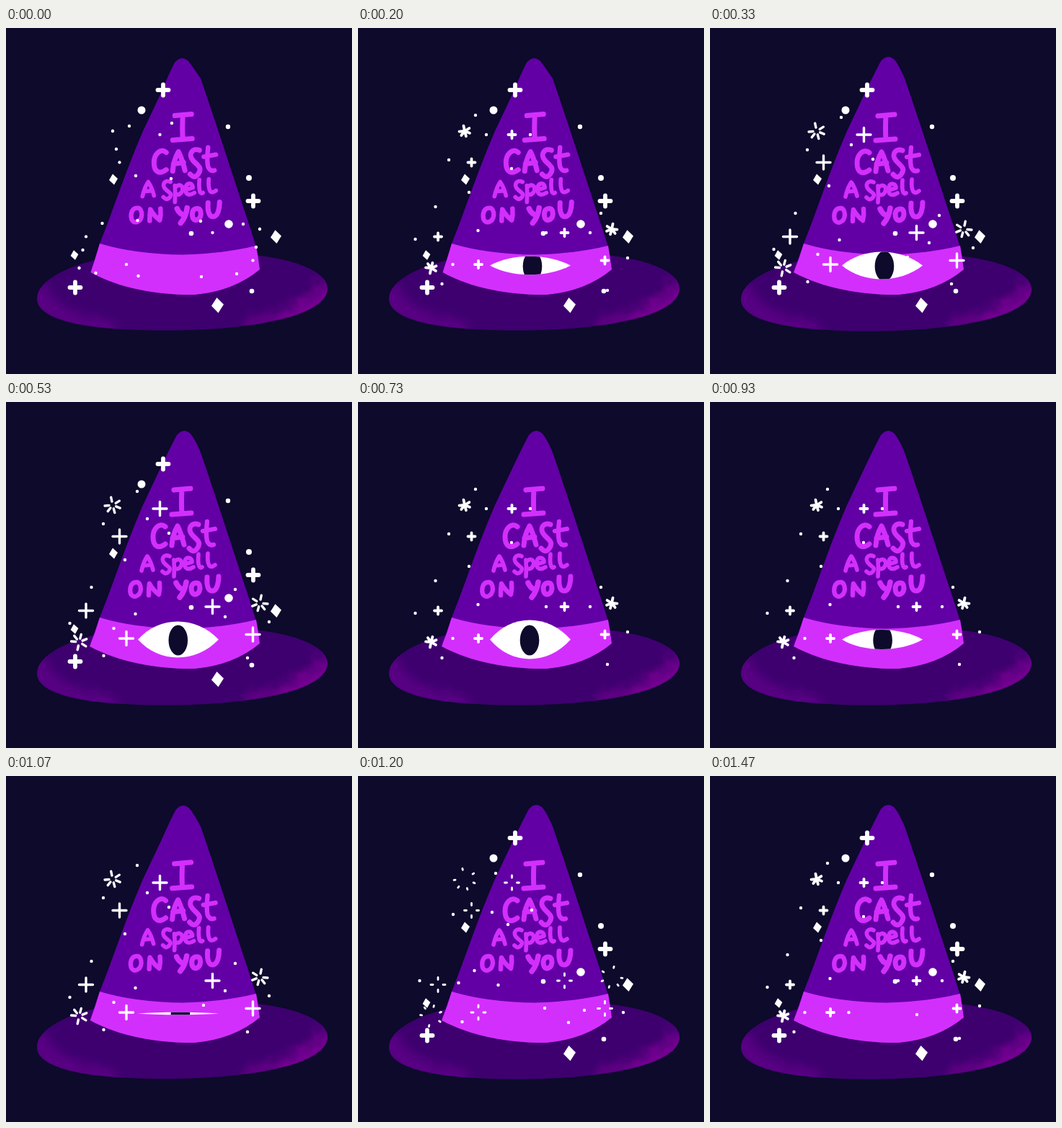
An HTML page for the animation above (1.54 s loop, 480x480 px).

```html
<!DOCTYPE html>
<html lang="en">
<head>
<meta charset="utf-8">
<title>Witch hat</title>
<style>
  html, body { margin: 0; width: 100%; height: 100%; overflow: hidden; background: #0d0a2c; }
  svg { display: block; width: 100%; height: 100%; }
  .line { fill: none; stroke-linecap: round; stroke-linejoin: round; }
</style>
</head>
<body>
<svg viewBox="0 0 480 480" role="img" aria-label="I cast a spell on you">
  <defs>
    <clipPath id="brimClip"><use href="#brim"/></clipPath>
    <clipPath id="eyeClip"><path id="lid"/></clipPath>
    <filter id="soft" x="-40%" y="-60%" width="180%" height="220%">
      <feGaussianBlur stdDeviation="7" result="blur"/>
      <feTurbulence type="fractalNoise" baseFrequency=".06" numOctaves="2" seed="4"/>
      <feDisplacementMap in="blur" scale="14"/>
    </filter>
  </defs>
  <rect width="480" height="480" fill="#0d0a2c"/>

  <g id="brimGroup">
    <path id="brim" fill="#3e006f" d="M122 323C88 331 43 350 43 376C43 400 88 420 220 420C350 420 446 398 446 362C446 338 400 322 349 316Z"/>
    <g clip-path="url(#brimClip)" class="line">
      <g filter="url(#soft)">
        <path d="M345 417Q430 399 449 358" stroke="#74008f" stroke-width="34" opacity=".6"/>
        <path d="M385 404Q425 392 445 370" stroke="#8b00a0" stroke-width="18" opacity=".6"/>
        <path d="M45 366Q54 406 140 420" stroke="#6c0092" stroke-width="30" opacity=".6"/>
      </g>
    </g>
  </g>

  <path id="cone" fill="#6200a5"/>
  <path id="band" fill="#d32ffc"/>

  <g id="words" class="line" stroke="#d32ffc" stroke-width="7">
    <path d="M233 122L256 120M244 122Q243 140 244 155M230 156L257 154"/>
    <path d="M221 173C213 166 204 176 204 187C204 201 212 204 221 197"/>
    <path d="M230 199Q231 184 238 172Q243 182 247 198M231 189L245 187"/>
    <path d="M267 170C257 166 251 176 258 184S271 194 266 202S257 206 254 203"/>
    <path d="M279 166Q277 184 279 193Q282 200 288 198M273 179L290 176" stroke-width="6.3"/>
    <g stroke-width="5.7">
      <path d="M188 234Q191 221 196 214Q201 221 204 233M191 227L202 226"/>
      <path d="M227 214C219 210 214 218 220 224S230 230 226 235S219 237 217 235"/>
      <path d="M233 219Q234 231 233 242M234 221C240 215 246 221 243 227S236 232 234 230"/>
      <path d="M248 225L258 222C258 215 250 214 248 221C246 231 252 234 260 229"/>
      <path d="M267 211Q266 223 268 228Q270 231 272 229M280 210Q279 222 282 227Q285 230 290 226"/>
    </g>
    <path d="M181 250C173 250 171 259 173 266C176 273 186 270 187 260C187 254 185 250 181 250Z" stroke-width="6.3"/>
    <path d="M198 268Q198 259 199 252Q204 261 212 267Q214 259 213 251" stroke-width="6.5"/>
    <path d="M236 251Q239 258 245 260M250 250Q248 263 241 271" stroke-width="7.5"/>
    <path d="M264 251C257 251 256 258 258 264C261 269 268 267 269 259C269 253 267 251 264 251Z"/>
    <path d="M279 243C278 256 281 263 287 262S295 250 295 242"/>
  </g>

  <g fill="#fff" stroke="#fff">
    <g id="bold"></g>
    <g id="sparks"></g>
  </g>

  <g id="eye" clip-path="url(#eyeClip)">
    <rect x="180" y="300" width="120" height="60" fill="#fff"/>
    <ellipse id="pupil" cy="330.5" rx="13.3" ry="21" fill="#0d0a2c"/>
  </g>
</svg>

<script>
const LOOP = 1540, STEPS = 23, CLOSED = 17;
const $ = id => document.getElementById(id);

// One cluster of sparkles, shown three times with mirroring: x, y, flip x, flip y
const clusters = [[148, 143, 1, 1], [101.5, 333, 1, -1], [352, 279, -1, 1]];
const rays = [22, 75, 128, 175, 258, 328];
const cross = [0, 90, 180, 270];

// Growth stages: inner and outer radius of plus and star, line width, dust around them
const stages = [
  { plus: [0, .1], star: [0, .1], width: 4.2, dust: [[23, -7], [5, 25], [82, -11], [32, 62], [81, 66]] },
  { plus: [0, 5], star: [0, 7.5], width: 3.8, dust: [[15, -22], [30, 5], [91, 5], [-22, 40], [65, 52], [6, 85]] },
  { plus: [0, 9.5], star: [5, 11], width: 3.4, dust: [[34, -19], [-13, 26], [48, 19], [17, 76], [78, 39]] },
  { plus: [7, 10], star: [13, 15], width: 2.8, dust: [[43, -8], [38, 46], [93, 43], [60, 63], [-16, 49]] }
];

const boldPluses = [[218, 86], [343, 240], [96, 360]];
const boldDots = [[188, 114, 5.5], [308, 137, 3.2], [337, 208, 4], [309, 272, 5.8], [341, 365, 3.3], [257, 285, 3.3]];
const diamonds = [[149, 210, 6], [374.5, 289.5, 7.5], [95, 315, 5.4], [293.5, 384.5, 8.5]];

const dot = ([x, y, r = 2.2]) => `<circle cx="${x}" cy="${y}" r="${r}" stroke="none"/>`;

const diamond = ([x, y, w]) => {
  const h = w * 1.25;
  return `<path stroke="none" d="M${x - 1} ${y - h}L${x + w} ${y - 1}L${x + 1} ${y + h}L${x - w} ${y + 1}Z"/>`;
};

function burst([x, y], angles, [inner, outer], width) {
  const d = angles.map(a => {
    const c = Math.cos(a * Math.PI / 180), s = Math.sin(a * Math.PI / 180);
    return `M${x + c * inner} ${y + s * inner}L${x + c * outer} ${y + s * outer}`;
  }).join('');
  return `<path class="line" d="${d}" stroke-width="${width}"/>`;
}

function drawHat(step) {
  const sway = step < CLOSED ? 1 - step % 3 / 2 : 0;
  const x = 246 - 3 * sway, y = 40 + 2 * sway, left = 116 + 1.5 * sway;
  $('cone').setAttribute('d', `M${left + 1} 335L130 299C147 258 163 206 190 143L217 86
    Q${x - 16} ${y + 19} ${x - 9} ${y + 6}Q${x} ${y - 5} ${x + 10} ${y + 4}
    Q${x + 17} ${y + 13} 270 70C286 116 316 208 333 260Q341 284 347 304L351 335Z`);
  $('band').setAttribute('d', `M130 299Q180 314 245 314.5Q302 313 347 302Q350 318 352 335
    Q316 365 262 370C215 371 158 362 ${left} 339Q124 320 130 299Z`);
  $('brimGroup').setAttribute('transform', `translate(0 ${.4 - sway})`);
  $('words').setAttribute('transform', `translate(${1.3 * sway} ${-.4 * sway})`);
}

// Sparkles grow through the stages and shrink back, two steps each.
function drawSparks(step) {
  const turn = Math.floor(step / 2) % 6;
  const { plus, star, width, dust } = stages[Math.min(turn, 6 - turn)];
  const cluster = burst([0, 0], rays, star, width) + burst([65.5, 5], cross, plus, width) +
    burst([9.5, 43.5], cross, plus, width) + dust.map(dot).join('');
  $('sparks').innerHTML = clusters.map(([x, y, sx, sy]) =>
    `<g transform="translate(${x} ${y}) scale(${sx} ${sy})">${cluster}</g>`).join('');
}

function drawBold(step) {
  const away = step > 9 && step < CLOSED, apart = step === 9 || step === CLOSED;
  const [reach, width] = apart ? [[12, 19], 4] : [[0, 7.5], 5.8];
  $('bold').innerHTML = away ? '' : boldPluses.map(p => burst(p, cross, reach, width)).join('') +
    boldDots.map(dot).join('') + diamonds.map(diamond).join('');
}

// The lids ease open for 11 steps, then close in 6.
function drawEye(step) {
  const open = step < 11
    ? 1 - (1 - step / 11) ** 2
    : (1 + Math.cos(Math.PI * Math.min(1, (step - 11) / 6))) / 2;
  const mid = 329.5, h = 36 * open;
  $('eye').style.display = step && step < CLOSED ? '' : 'none';
  $('lid').setAttribute('d', `M183 ${mid}C213 ${mid - h} 263 ${mid - h} 295 ${mid}C263 ${mid + h} 213 ${mid + h} 183 ${mid}Z`);
  $('pupil').setAttribute('cx', 238 + Math.min(4, (step - 10.5) ** 2 * .13));
}

let last = -1;
function render(time) {
  const t = time % LOOP;
  // Steps of 1/15 s, rounded to 10 ms
  const step = Math.min(STEPS - 1, Math.floor((t + 5) * 3 / 200));
  if (step === last) return;
  last = step;
  drawHat(step);
  drawSparks(step);
  drawBold(step);
  drawEye(step);
}

const began = performance.now();
function tick() {
  render(performance.now() - began);
  requestAnimationFrame(tick);
}
tick();
</script>
</body>
</html>
```
